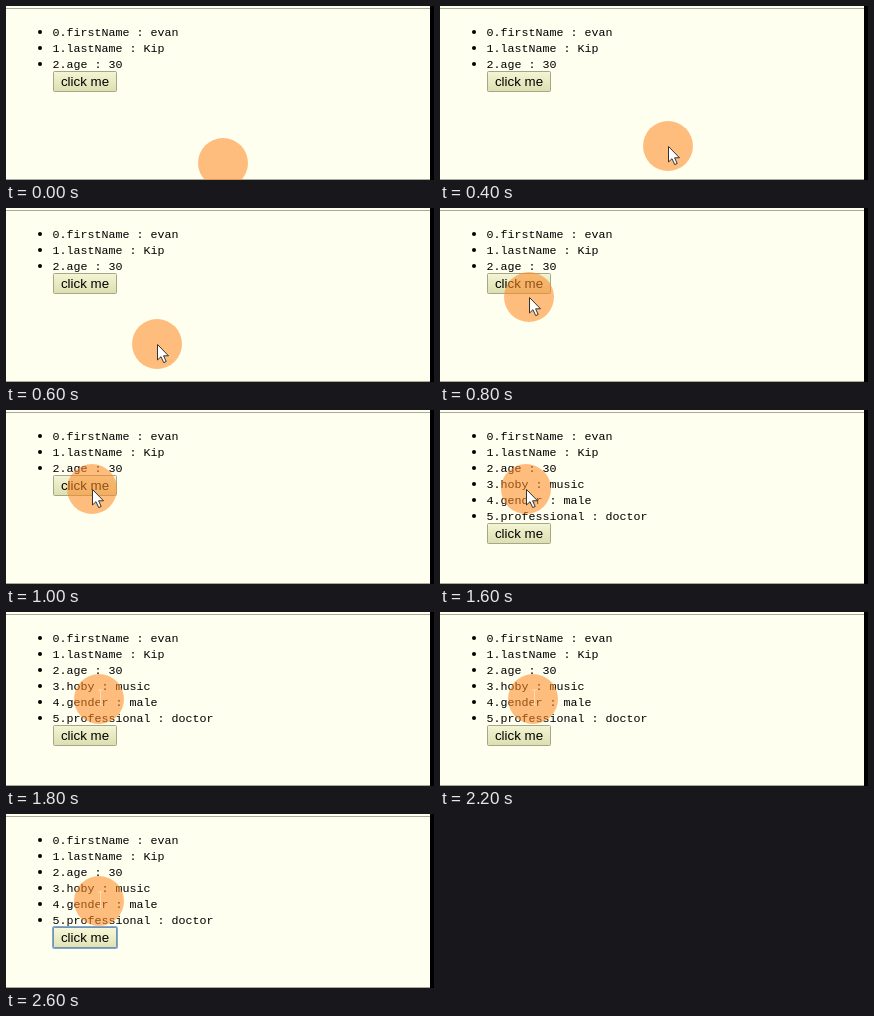
An HTML page for the animation above (2.8 s loop, 428x174 px).

```html
<!DOCTYPE html>
<html lang="en">
<head>
<meta charset="utf-8">
<style>
html, body { margin: 0; width: 100%; height: 100%; overflow: hidden; background: #fffff0; }
svg { display: block; }
.row { font: 11.67px "Liberation Mono", monospace; }
.label { font: 13.33px "Liberation Sans", Arial, sans-serif; text-anchor: middle; }
</style>
</head>
<body>
<svg width="428" height="174" viewBox="0 0 428 174">
  <defs>
    <linearGradient id="normal" x2="0" y2="1"><stop stop-color="#f4f5d4"/><stop offset="1" stop-color="#dcdfb0"/></linearGradient>
    <linearGradient id="active" x2="0" y2="1"><stop stop-color="#e2e4c4"/><stop offset="1" stop-color="#eff0d2"/></linearGradient>
    <linearGradient id="focus" x2="0" y2="1"><stop stop-color="#f8f8da"/><stop offset="1" stop-color="#e0e2b4"/></linearGradient>
  </defs>
  <path d="M0 2.5H424M0 173.5H424" stroke="#a9a99c"/>
  <rect x="424" width="4" height="174"/>
  <g id="list"></g>
  <g id="button">
    <rect id="ring" x="47" width="64" height="21" rx="1.5" fill="none" stroke="#7fa9d4" stroke-width="2"/>
    <rect id="face" x="47.5" y=".5" width="63" height="20" rx="1"/>
    <text class="label" x="79" y="15">click me</text>
  </g>
  <g id="pointer">
    <circle r="25" fill="#ff8c28" fill-opacity=".57"/>
    <path id="arrow" d="M.5 .5V16L4 12.7L6.7 18.6L9.2 17.5L6.6 11.8H11.5Z" fill="#fff" stroke="#333"/>
    <path id="beam" d="M-1 -9H4M1.5 -9V6M-1 6H4" fill="none" stroke="#ffdcb4"/>
  </g>
</svg>
<script>
const $ = id => document.getElementById(id);
const STEP = 200, LOOP = 2800;
const rows = ["firstName : evan", "lastName : Kip", "age : 30",
  "hoby : music", "gender : male", "professional : doctor"];
// pointer position from each step onward
const path = [[0, 217, 157], [1, 226, 143], [2, 228, 140], [3, 151, 136],
  [4, 89, 89], [5, 86, 79], [9, 93, 87]];

$("list").innerHTML = rows.map((text, i) =>
  `<g><circle cx="34" cy="${26 + 16 * i}" r="2"/>
   <text class="row" x="46.5" y="${30 + 16 * i}">${i}.${text}</text></g>`).join("");

const show = (el, on) => el.setAttribute("visibility", on ? "visible" : "hidden");

function draw(now) {
  const step = Math.floor(now % LOOP / STEP);
  const count = step < 8 ? 3 : 6;
  [...$("list").children].forEach((row, i) => show(row, i < count));
  $("button").setAttribute("transform", `translate(0 ${17 + 16 * count})`);

  const state = step === 7 ? "active" : step === 13 ? "focus" : "normal";
  $("face").setAttribute("fill", `url(#${state})`);
  $("face").setAttribute("stroke", state === "focus" ? "#7893a6" : "#a5a68a");
  show($("ring"), state === "focus");

  const [, x, y] = path.findLast(p => p[0] <= step);
  $("pointer").setAttribute("transform", `translate(${x} ${y})`);
  show($("arrow"), step > 0 && step < 9);
  show($("beam"), step > 8);
  requestAnimationFrame(draw);
}
draw(0);
</script>
</body>
</html>
```
